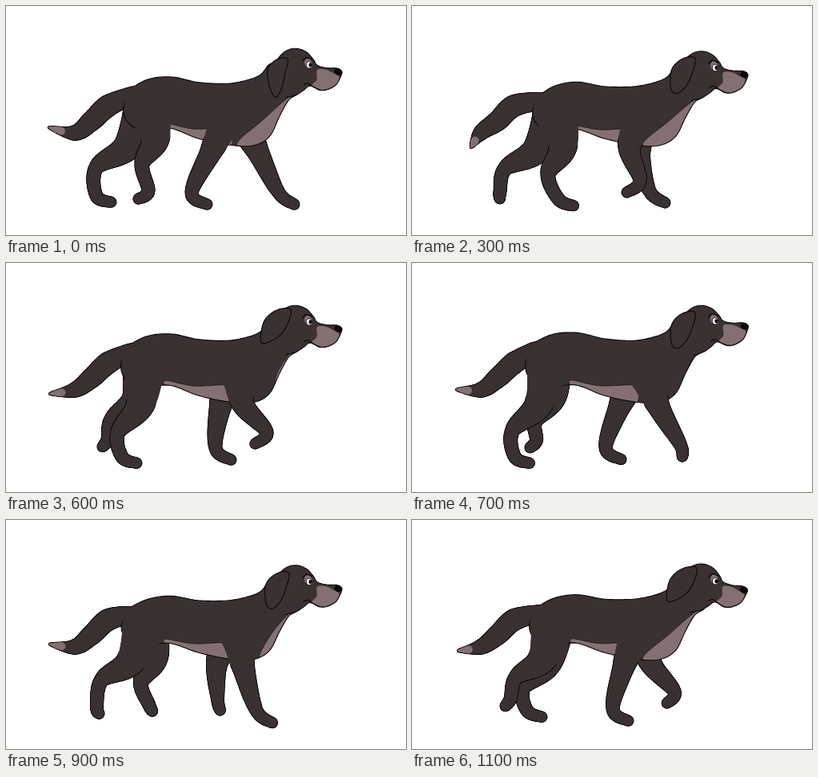
Recreate the animation shown at these times as an HTML page with a canvas. Size 500 by 287 pixels, loop 1200 ms.

```html
<!DOCTYPE html>
<html lang="en">
<head>
<meta charset="utf-8">
<title>Walking dog</title>
<style>
  html, body { margin: 0; width: 100%; height: 100%; overflow: hidden; background: #fff; }
  canvas { display: block; width: 500px; height: 287px; }
</style>
</head>
<body>
<canvas id="stage" width="500" height="287"></canvas>
<script>
const ctx = document.getElementById("stage").getContext("2d");
const COAT = "#3a3232", PINK = "#847072", INK = "#080606";
const LOOP = 1200, STEP = 100;
const TIMES = [0, 200, 400, 600, 800, 1000, 1100];

// Fore legs: wrist x, y and how far the paw is tucked (0 planted, 1 folded back).
const nearFore = [[232,234,0], [263,222,1], [307,216,1], [326,212,0.95], [345,244,0], [282,235,0], [251,237,0]];
const farFore = [[341,234,0], [307,231,0], [287,233,0], [262,232,0], [222,231,0], [307,217,0.9], [328,215,0.8]];

// Hind legs: hock x, y, ankle x, y and tuck.
const nearHind = [[170,198,178,232,1], [184,211,200,242,0], [156,210,167,243,0], [140,212,145,243,0],
  [111,208,112,243,0], [128,193,115,225,1], [130,197,123,224,0.8]];
const farHind = [[113,202,113,238,0], [108,209,99,238,0.2], [125,198,121,227,1], [132,196,127,221,0.8],
  [176,200,184,223,0.9], [161,207,173,239,0], [139,210,144,239,0]];

// Tail tip x, y, sideways shift of the rump, ear lift.
const sway = [[53,152,0,0], [64,165,0,0], [83,190,8,1], [54,164,-3,0.9], [56,153,-7,0], [52,158,2,0.8], [57,164,0,0.9]];

const EAR_DOWN = [352,66, 338,67, 327,80, 330,102, 337,114, 344,104, 349,84];
const EAR_UP = [356,57, 338,58, 322,72, 317,97, 325,98, 341,90, 352,76];
const TORSO = [152,145, 147,125, 160,101, 180,90, 208,88, 240,95, 275,97, 300,93, 318,86, 335,72, 366,104,
  353,118, 342,138, 329,164, 308,175, 278,174, 240,166, 205,153, 172,156];
const SKULL = [334,74, 342,62, 351,55, 362,53, 374,57, 383,66, 388,73, 400,76, 413,76, 419,80, 417,88,
  412,97, 402,103, 392,104, 380,99, 372,105, 363,111, 350,115];
const MUZZLE = [388,79, 398,78, 408,82, 416,87, 412,96, 402,102, 393,103, 382,99, 388,91];

const lerp = (a, b, k) => a + (b - a) * k;
const blend = (a, b, k) => a.map((v, i) => lerp(v, b[i], k));
const clamp = v => Math.max(0, Math.min(1, v));

function sample(track, time) {
  const next = TIMES.findIndex(t => t > time);
  const i = next < 0 ? TIMES.length - 1 : next - 1;
  return blend(track[i], track[(i + 1) % track.length], (time - TIMES[i]) / ((TIMES[i + 1] ?? LOOP) - TIMES[i]));
}

// Body parts rise and fall twice per loop.
const bob = (time, lowest, size) => size * Math.cos((time - lowest) / LOOP * 4 * Math.PI);

function spline(a, b, c, d, k) {
  return b.map((v, i) => v + 0.5 * k * (c[i] - a[i] +
    k * (2 * a[i] - 5 * v + 4 * c[i] - d[i] + k * (3 * (v - c[i]) + d[i] - a[i]))));
}

function curve(list, closed = true) {
  const n = list.length / 2;
  const p = i => {
    const j = closed ? (i + n) % n : Math.max(0, Math.min(n - 1, i));
    return list.slice(2 * j, 2 * j + 2);
  };
  const path = new Path2D();
  for (let s = 0; s <= (closed ? n : n - 1); s += 0.125) {
    const i = Math.floor(s);
    path.lineTo(...spline(p(i - 1), p(i), p(i + 1), p(i + 2), s - i));
  }
  return path;
}

function fill(path, color) {
  ctx.fillStyle = color;
  ctx.fill(path);
}

function ink(path, width = 1.1) {
  ctx.strokeStyle = INK;
  ctx.lineWidth = width;
  ctx.stroke(path);
}

function oval(x, y, rx, ry, color, turn = 0) {
  const path = new Path2D();
  path.ellipse(x, y, rx, ry, turn, 0, 2 * Math.PI);
  fill(path, color);
  return path;
}

// Tapered tube along joints [x, y, radius]; its outline begins at joint position inkFrom.
function tube(joints, inkFrom = 0, tipFrom = Infinity) {
  const p = i => joints[Math.max(0, Math.min(joints.length - 1, i))];
  const dots = [];
  for (let s = 0; s <= joints.length - 1; s += 0.04) {
    const i = Math.floor(s), k = s - i;
    const [x, y] = spline(p(i - 1), p(i), p(i + 1), p(i + 2), k);
    dots.push({ s, x, y, r: lerp(p(i)[2], p(i + 1)[2], k) });
  }
  dots.filter(d => d.s >= inkFrom).forEach(d => oval(d.x, d.y, d.r + 0.9, d.r + 0.9, INK));
  dots.forEach(d => oval(d.x, d.y, d.r, d.r, d.s > tipFrom ? PINK : COAT));
}

// Joint between two others, pushed sideways off the straight line.
function bent([ax, ay], [bx, by], k, push) {
  const d = Math.hypot(bx - ax, by - ay);
  return [lerp(ax, bx, k) + push * (by - ay) / d, lerp(ay, by, k) - push * (bx - ax) / d];
}

function foreLeg([x, y, tuck], lift, inkFrom) {
  const shoulder = [285 + 0.15 * (x - 285), 140 + lift];
  const reach = Math.hypot(x - shoulder[0], y - shoulder[1]);
  const elbow = bent(shoulder, [x, y], 0.45, -0.45 * Math.max(0, 105 - reach));
  tube([[...shoulder, 22], [...elbow, 13], [x, y, 7.5], [x + lerp(20, -17, tuck), y + 15, 6]], inkFrom);
}

function hindLeg([x, y, ankleX, ankleY, tuck], hip, inkFrom) {
  const knee = bent(hip, [x, y], 0.55, 14);
  tube([[...hip, 28], [...knee, 17], [x, y, 8.5], [ankleX, ankleY, 7.5],
    [ankleX + lerp(19, -13, tuck), ankleY + lerp(8, 10, tuck), 6]], inkFrom);
}

function drawTorso(rumpX, rumpY, lift, reachX) {
  const warp = list => list.map((v, i) => {
    const x = list[i - i % 2], y = list[i - i % 2 + 1];
    if (i % 2 === 0) return v + rumpX * clamp((220 - x) / 70);
    return v + clamp((165 - y) / 60) * lerp(rumpY, lift, clamp((x - 180) / 100));
  });
  const outline = curve(warp(TORSO));
  const forward = Math.max(0, reachX - 295); // the shoulder hides the chest as the leg swings ahead
  fill(outline, COAT);
  ctx.save();
  ctx.clip(outline);
  for (const patch of [
    [200,147, 235,154, 280,153, 284,164, 276,180, 240,172, 205,158],
    [288 + 1.5 * forward,175, 322 + 0.5 * forward,142, 356,112, 366,112, 352,150, 335,180]
  ]) {
    fill(curve(warp(patch)), PINK);
    ink(curve(warp(patch)), 0.6);
  }
  ctx.restore();
  ink(outline);
}

function drawHead(dy, tilt, earLift) {
  ctx.save();
  ctx.translate(361, 75 + dy);
  ctx.rotate(tilt * Math.PI / 180);
  ctx.translate(-360, -75);
  const skull = curve(SKULL, false);
  fill(skull, COAT);
  fill(curve(MUZZLE), PINK);
  ink(skull);
  ink(curve([372,98, 377,96, 384,100, 392,104], false));
  oval(376.5, 70.5, 4.6, 6, PINK, -0.2);
  ink(oval(378, 73, 3.6, 4.2, "#fff", -0.2), 0.8);
  oval(379.3, 73, 1.9, 2.6, INK);
  ink(curve([370,68, 374,64, 381,66], false), 1.4);
  oval(414.5, 80.5, 5, 4, INK, 0.2);
  ctx.restore();

  ctx.save();
  ctx.translate(0, dy);
  const ear = curve(blend(EAR_DOWN, EAR_UP, earLift));
  fill(ear, COAT);
  ink(ear);
  ctx.restore();
}

function draw(time) {
  const [tipX, tipY, rumpX, earLift] = sample(sway, time);
  const rumpY = 5 + bob(time, 385, 6);
  const lift = 2 + bob(time, 350, 2);
  const tilt = 2 + bob(time, 450, 4);
  const hip = [176 + rumpX, 123 + rumpY];
  const reach = sample(nearFore, time);

  ctx.fillStyle = "#fff";
  ctx.fillRect(0, 0, 500, 287);
  ctx.lineJoin = ctx.lineCap = "round";
  hindLeg(sample(farHind, time), hip, 0);
  foreLeg(sample(farFore, time), lift, 0);
  tube([[160 + rumpX, 110 + rumpY, 10], [128,125,13], [107,144,12], [86,159,9], [tipX, tipY, 0.6]], 0, 3.45);
  drawTorso(rumpX, rumpY, lift, reach[0]);
  hindLeg(sample(nearHind, time), hip, 0.9);
  foreLeg(reach, lift, 0.8);
  drawHead(lift, tilt, earLift);
}

const start = performance.now();
function tick() {
  const step = Math.floor(((performance.now() - start) % LOOP) / STEP);
  draw((step === 5 ? 4 : step) * STEP); // one pose is held twice as long
  requestAnimationFrame(tick);
}
tick();
</script>
</body>
</html>
```
